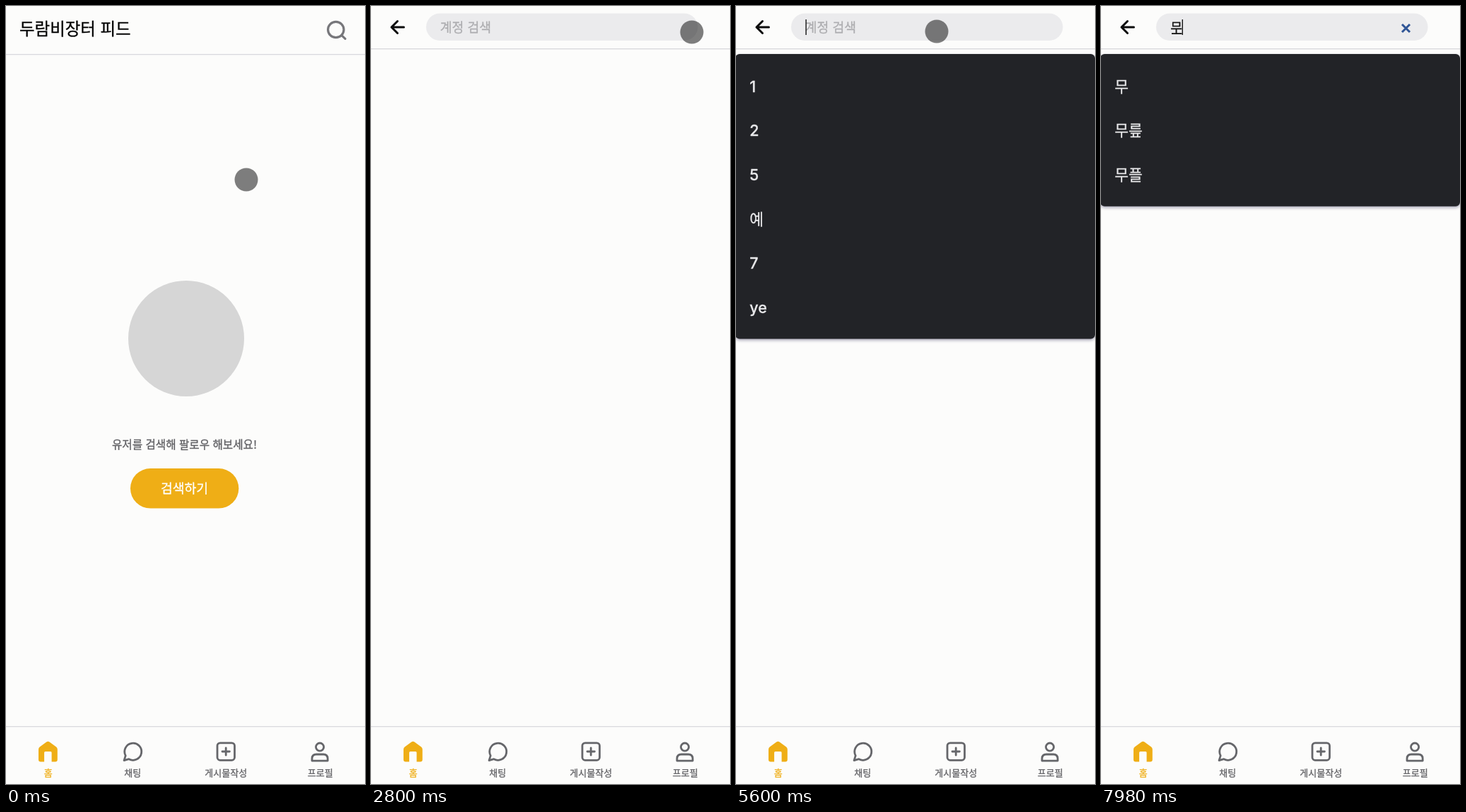
An HTML page that plays this animation: 508x1102 px, repeating every 8 s.

```html
<!DOCTYPE html>
<html lang="ko">
<head>
<meta charset="utf-8">
<title>피드</title>
<style>
  html, body { margin: 0; width: 100%; height: 100%; overflow: hidden; background: #fcfcfb; }
  svg { display: block; width: 508px; height: 1102px; }
  text {
    font: 500 18.24px "Noto Sans CJK KR", "Noto Sans CJK", "Noto Sans", sans-serif;
    fill: currentColor; stroke: currentColor; stroke-width: .3px;
  }
  .mid { text-anchor: middle; }
  .line { fill: none; stroke: #65666a; stroke-width: 2.8; stroke-linecap: round; stroke-linejoin: round; }
  .rule { fill: #d9d9dd; }
  .tab { font-size: 13.03px; color: #626266; text-anchor: middle; }
  .on { color: #efae16; }
  #list text { font: 500 21.5px Inter, "Noto Sans CJK KR", "Noto Sans CJK", sans-serif; color: #e9e9eb; }
  #panel { fill: #222327; filter: drop-shadow(0 2px 2px rgba(40, 35, 80, .4)); }
</style>
</head>
<body>
<svg viewBox="0 0 508 1102">
  <g id="home">
    <text x="19" y="41" style="font-size:23.45px">두람비장터 피드</text>
    <g class="line" style="stroke:#77777b;stroke-width:3.2">
      <circle cx="466.8" cy="33.5" r="11.2"/>
      <path d="M475 41.7L480 46.4"/>
    </g>
    <rect class="rule" y="68" width="508" height="1.3"/>
    <circle cx="255" cy="471" r="82" fill="#d6d6d6"/>
    <text class="mid" x="252.5" y="626.5" color="#5f5f63" style="font-size:15.63px">유저를 검색해 팔로우 해보세요!</text>
    <rect x="176" y="655" width="153.3" height="56.6" rx="28.3" fill="#efae16"/>
    <text class="mid" x="252.5" y="689.5" color="#fff">검색하기</text>
  </g>

  <g id="search">
    <path class="line" style="stroke:#0c0c0c;stroke-width:3" d="M46.5 30H29M37.5 21.5L29 30L37.5 38.5"/>
    <rect x="78" y="10.5" width="384.5" height="38.5" rx="19.25" fill="#ebebed"/>
    <rect class="rule" y="60" width="508" height="1.4"/>
    <text id="hint" x="97.8" y="36.5" color="#adadb0">계정 검색</text>
    <g id="entry">
      <text id="typed" x="98.3" y="36.5" color="#141414"></text>
      <rect x="100" y="38.2" width="14.5" height="1.8" fill="#141414"/>
      <path class="line" style="stroke:#2f5596;stroke-width:3;stroke-linecap:butt" d="M426 26L437 37M437 26L426 37"/>
    </g>
    <rect id="caret" y="19" width="1.4" height="22" fill="#141414"/>
    <g id="list">
      <rect id="panel" x="-1" y="68" width="509" rx="6"/>
      <g id="rows"></g>
    </g>
  </g>

  <rect class="rule" y="1020" width="508" height="1.3"/>
  <g class="line" transform="translate(-.4 -.4)">
    <path class="on" fill="currentColor" stroke="none" d="M57.6 1043Q59.8 1041.4 62 1043L71.5 1050Q73.2 1051.3 73.2 1053.5V1068Q73.2 1071 70.2 1071H65V1058Q65 1056.5 63.5 1056.5H56Q54.5 1056.5 54.5 1058V1071H49.4Q46.4 1071 46.4 1068V1053.5Q46.4 1051.3 48.1 1050Z"/>
    <path d="M167.5 1069L169.6 1062.3A12 12 0 1 1 174.3 1067.1Z"/>
    <rect x="299.4" y="1044.2" width="24.5" height="24.5" rx="4"/>
    <path d="M311.6 1051.2V1061.6M306.4 1056.4H316.8"/>
    <circle cx="444.5" cy="1050" r="5.6"/>
    <path d="M433.4 1069.5V1066.5Q433.4 1060.4 439.5 1060.4H449.5Q455.6 1060.4 455.6 1066.5V1069.5Z"/>
  </g>
  <text class="tab on" x="59.8" y="1091.3">홈</text>
  <text class="tab" x="179.2" y="1091.3">채팅</text>
  <text class="tab" x="311.2" y="1091.3">게시물작성</text>
  <text class="tab" x="444.8" y="1091.3">프로필</text>

  <circle id="dot" r="16.5" fill="#000" fill-opacity=".5"/>
</svg>
<script>
const LOOP = 8000, OPEN = 2520, FOCUS = 5240, KEY1 = 6880, KEY2 = 7860;
const $ = id => document.getElementById(id);
const show = (id, on) => { $(id).style.display = on ? '' : 'none'; };
const ramp = (t, a, b) => Math.min(1, Math.max(0, (t - a) / (b - a)));

// time, x, y of the touch pointer
const path = [
  [0, 340, 246], [20, 340, 246], [400, 392, 187], [820, 443, 129], [1100, 462, 102],
  [1340, 472, 72], [1600, 463, 46], [2100, 451.5, 37.5], [2300, 451.5, 37.5], [2400, 454, 37],
  [3520, 454, 37], [3660, 434, 41], [3900, 352, 49], [4180, 284, 36], [LOOP, 284, 36]
];

const lists = {
  all: ['1', '2', '5', '예', '7', 'ye'],
  match: ['무', '무릎', '무플']
};
let current;

function fill(name) {
  if (name === current) return;
  current = name;
  const items = lists[name];
  $('panel').setAttribute('height', 28 + items.length * 62.6);
  $('rows').innerHTML = items
    .map((s, i) => `<text x="19.3" y="${(121.8 + i * 62.6).toFixed(1)}">${s}</text>`).join('');
}

function draw(t) {
  const i = path.findIndex(p => p[0] > t);
  const [t0, x0, y0] = path[i - 1], [t1, x1, y1] = path[i];
  const k = ramp(t, t0, t1);
  $('dot').setAttribute('cx', x0 + (x1 - x0) * k);
  $('dot').setAttribute('cy', y0 + (y1 - y0) * k);
  show('dot', t < KEY1);

  show('home', t < OPEN);
  show('search', t >= OPEN);
  show('hint', t < KEY1);
  show('entry', t >= KEY1);
  $('typed').textContent = t < KEY2 ? 'ㅁ' : '무';

  const blinkOff = (t >= 5880 && t < 6560) || (t >= 7560 && t < KEY2);
  show('caret', t >= FOCUS && !blinkOff);
  $('caret').setAttribute('x', t < KEY1 ? 98.4 : 114.6);

  fill(t < 7500 ? 'all' : 'match');
  const alpha = t < 7500
    ? ramp(t, 5480, 5600) * (1 - ramp(t, 6990, 7120))
    : ramp(t, 7900, 7970);
  $('list').style.opacity = alpha;
}

const start = performance.now();
function tick() {
  draw((performance.now() - start) % LOOP);
  requestAnimationFrame(tick);
}
tick();
</script>
</body>
</html>
```
